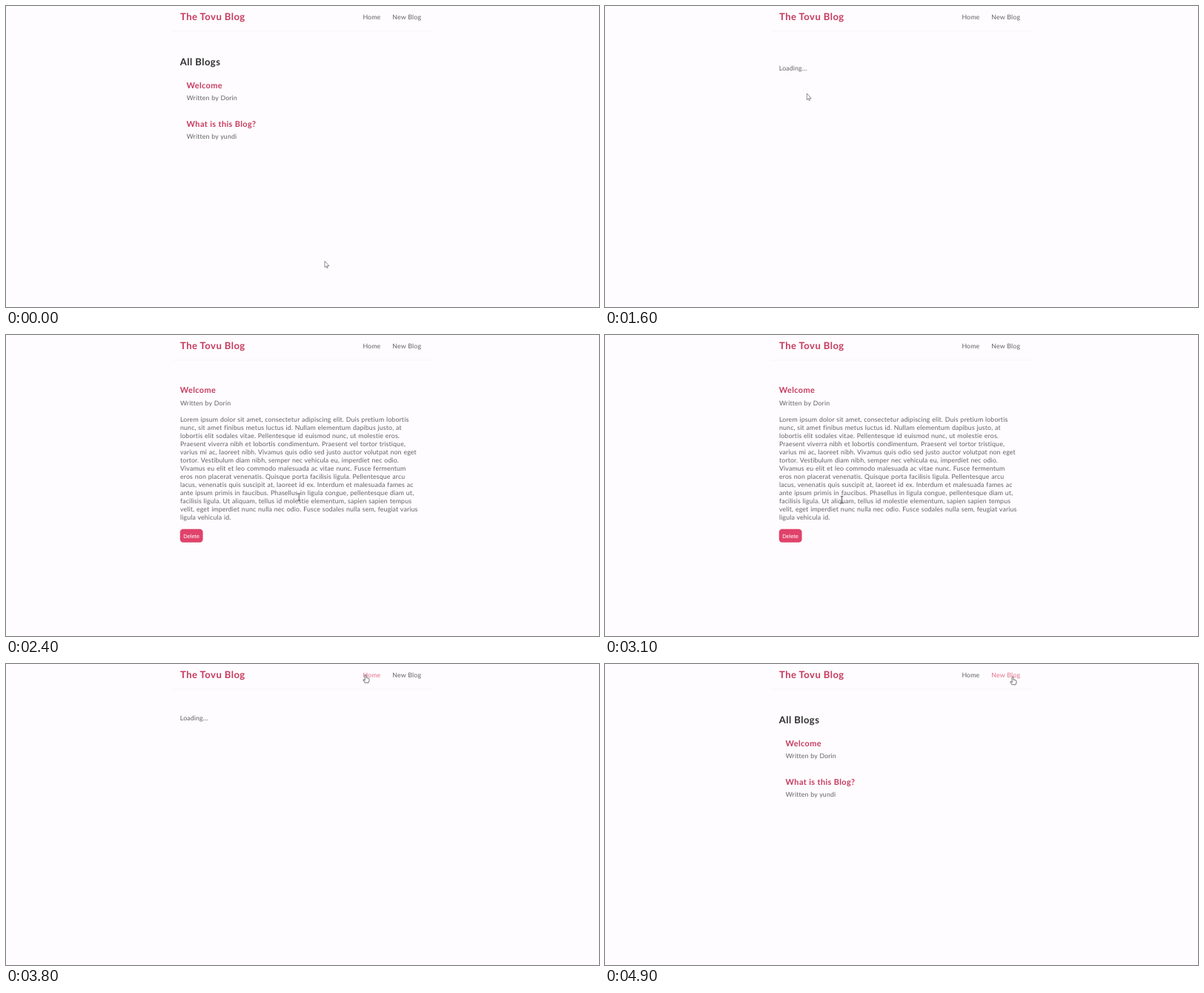
An HTML page for the animation above (5 s loop, 800 by 406 pixels).

```html
<!DOCTYPE html>
<html lang="en">
<head>
<meta charset="utf-8">
<title>Blog walkthrough</title>
<style>
  html, body { margin: 0; width: 100%; height: 100%; overflow: hidden; background: #fefcfe; }
  svg { display: block; width: 100%; height: 100%; }
  text { white-space: pre; text-rendering: geometricPrecision; font-family: Lato, "Open Sans", sans-serif; }
  .body { font-size: 8.8px; letter-spacing: .135px; word-spacing: .35px; fill: #626262; }
  .title, .head { font-size: 13.1px; font-weight: 700; letter-spacing: .43px; }
  .title, .sub { fill: #c63a5e; }
  .head { fill: #303030; }
  .sub { font-size: 10.94px; font-weight: 700; letter-spacing: .36px; }
  .button { font: 7.5px "Liberation Sans", Arial, sans-serif; fill: #fff; }
  .status { font: 7px "Open Sans", sans-serif; fill: #ddd; }
  .hot { fill: #e2708c; }
  .card { fill: #fffdff; filter: drop-shadow(.55px 1.6px 1.4px rgba(0, 0, 0, .16)); }
  #cursor path { stroke-linejoin: round; stroke-linecap: round; }
</style>
</head>
<body>
<svg viewBox="0 0 800 406">
  <rect width="800" height="406" fill="#fefcfe"/>
  <rect x="225" y="33.7" width="350" height=".6" fill="#f0eef0"/>
  <text class="title" x="235" y="19.4">The Tovu Blog</text>
  <text class="body" id="home" x="481.4" y="18">Home</text>
  <text class="body" id="fresh" x="521.3" y="18">New Blog</text>

  <g id="list">
    <rect class="card" id="card1" x="235" y="95" width="328.5" height="40.3"/>
    <rect class="card" id="card2" x="235" y="146.3" width="328.5" height="40.3"/>
    <text class="head" x="234.8" y="80.4">All Blogs</text>
    <text class="sub" x="243.6" y="111.4">Welcome</text>
    <text class="body" x="243.7" y="127.3">Written by Dorin</text>
    <text class="sub" x="243.6" y="162.6">What is this Blog?</text>
    <text class="body" x="243.7" y="178.5">Written by yundi</text>
  </g>

  <text class="body" id="loading" x="234.8">Loading...</text>

  <g id="post">
    <text class="sub" x="234.8" y="78">Welcome</text>
    <text class="body" x="235" y="95.3">Written by Dorin</text>
    <g id="story"></g>
    <rect x="234.8" y="261.8" width="30.8" height="18" rx="4.2" fill="#e0426b"/>
    <text class="button" x="239.2" y="273.6">Delete</text>
  </g>

  <g id="bubble">
    <path id="plate" fill="#202022"/>
    <text class="status" id="address" x="4" y="409.5"></text>
  </g>

  <g id="cursor">
    <path id="arrow" d="M0 0V8.2L1.9 6.5 3.1 9.2 4.3 8.7 3.1 6.1H5.5Z" fill="#fff" stroke="#555" stroke-width=".65"/>
    <path id="hand" d="M-1 1Q-1 0 0 0Q1 0 1 1V4L4.4 4.8Q5 5 5 6V8L4 10.6H-1L-3 7.4Q-3.4 6.1 -2.3 6.3L-1 7.5Z" fill="#fff" stroke="#444" stroke-width=".75"/>
    <path id="beam" d="M-1.5-4.5H1.5M0-4.5V4.5M-1.5 4.5H1.5" fill="none" stroke="#444" stroke-width=".8"/>
  </g>
</svg>
<script>
const LOOP = 5000, STEP = 100, FETCH = 1000;
const OPEN_POST = 1400, GO_HOME = 3800; // clicks
const el = id => document.getElementById(id);
const showOnly = (ids, chosen) => ids.forEach(id => { el(id).style.display = id === chosen ? "" : "none"; });

const story = `Lorem ipsum dolor sit amet, consectetur adipiscing elit. Duis pretium lobortis
nunc, sit amet finibus metus luctus id. Nullam elementum dapibus justo, at
lobortis elit sodales vitae. Pellentesque id euismod nunc, ut molestie eros.
Praesent viverra nibh et lobortis condimentum. Praesent vel tortor tristique,
varius mi ac, laoreet nibh. Vivamus quis odio sed justo auctor volutpat non eget
tortor. Vestibulum diam nibh, semper nec vehicula eu, imperdiet nec odio.
Vivamus eu elit et leo commodo malesuada ac vitae nunc. Fusce fermentum
eros non placerat venenatis. Quisque porta facilisis ligula. Pellentesque arcu
lacus, venenatis quis suscipit at, laoreet id ex. Interdum et malesuada fames ac
ante ipsum primis in faucibus. Phasellus in ligula congue, pellentesque diam ut,
facilisis ligula. Ut aliquam, tellus id molestie elementum, sapien sapien tempus
velit, eget imperdiet nunc nulla nec odio. Fusce sodales nulla sem, feugiat varius
ligula vehicula id.`;

story.split("\n").forEach((line, i) => {
  const row = document.createElementNS("http://www.w3.org/2000/svg", "text");
  row.setAttribute("class", "body");
  row.setAttribute("x", 235);
  row.setAttribute("y", 117.3 + i * 10.94);
  row.textContent = line;
  el("story").append(row);
});

// Places the pointer visits, with arrival times; it eases between them
const stops = [
  { t: 100, x: 430, y: 344.4 },
  { t: 800, x: 260, y: 110.7 },
  { t: 1500, x: 262, y: 111.5 },
  { t: 2100, x: 402, y: 205 },
  { t: 2500, x: 394, y: 221 },
  { t: 2900, x: 284, y: 217 },
  { t: 3100, x: 319.6, y: 222.2 },
  { t: 3200, x: 597, y: 74 },
  { t: 3700, x: 485, y: 14.6 },
  { t: 3900, x: 485, y: 14.6 },
  { t: 4300, x: 544, y: 92.3 },
  { t: 4500, x: 549, y: 91 },
  { t: 4900, x: 550, y: 17.2 }
];

function pointer(t) {
  const next = stops.findIndex(s => s.t >= t);
  const b = stops[next], a = stops[Math.max(next - 1, 0)];
  const k = a === b ? 0 : (t - a.t) / (b.t - a.t);
  const ease = k * k * (3 - 2 * k);
  return { x: a.x + (b.x - a.x) * ease, y: a.y + (b.y - a.y) * ease };
}

function viewAt(t) {
  const waiting = click => t >= click && t < click + FETCH;
  if (waiting(OPEN_POST) || waiting(GO_HOME)) return "loading";
  return t > OPEN_POST && t < GO_HOME ? "post" : "list";
}

function hoverAt(t) {
  const { x, y } = pointer(t);
  const inside = (left, top, right, bottom) => x > left && x < right && y > top && y < bottom;
  if (inside(476, 5, 511, 22)) return "home";
  if (inside(516, 5, 565, 22)) return "fresh";
  if (viewAt(t) === "list" && inside(235, 95, 563, 135)) return "card1";
  if (viewAt(t) === "list" && inside(235, 146, 563, 186)) return "card2";
  if (viewAt(t) === "post" && inside(235, 108, 563, 250)) return "story";
  return "";
}

// The address fades in over two steps while the same link stays hovered
function bubbleAt(t) {
  const link = hoverAt(t);
  if (!link || link === "story" || viewAt(t) === "loading") return 0;
  const same = n => hoverAt(Math.max(t - n * STEP, 0)) === link;
  return same(1) ? (same(2) ? 1 : .5) : 0;
}

function draw(t) {
  const view = viewAt(t), hover = hoverAt(t), { x, y } = pointer(t);
  const late = t > OPEN_POST + FETCH;

  showOnly(["list", "loading", "post"], view);
  showOnly(["card1", "card2"], hover);
  showOnly(["arrow", "hand", "beam"], hover === "story" ? "beam" : hover ? "hand" : "arrow");
  for (const id of ["home", "fresh"]) el(id).classList.toggle("hot", id === hover);

  el("loading").setAttribute("y", late ? 76 : 87);
  const w = late ? 38.5 : 63.5;
  el("plate").setAttribute("d", `M0 402H${w - 2}Q${w} 402 ${w} 404V406H0Z`);
  el("address").textContent = late ? "devbox:4000" : "devbox:4000/notes/1";
  el("bubble").style.opacity = bubbleAt(t);
  el("cursor").setAttribute("transform", `translate(${x} ${y})`);
}

const start = performance.now();
function tick() {
  const t = (performance.now() - start) % LOOP;
  draw(Math.floor(t / STEP) * STEP);
  requestAnimationFrame(tick);
}
tick();
</script>
</body>
</html>
```
